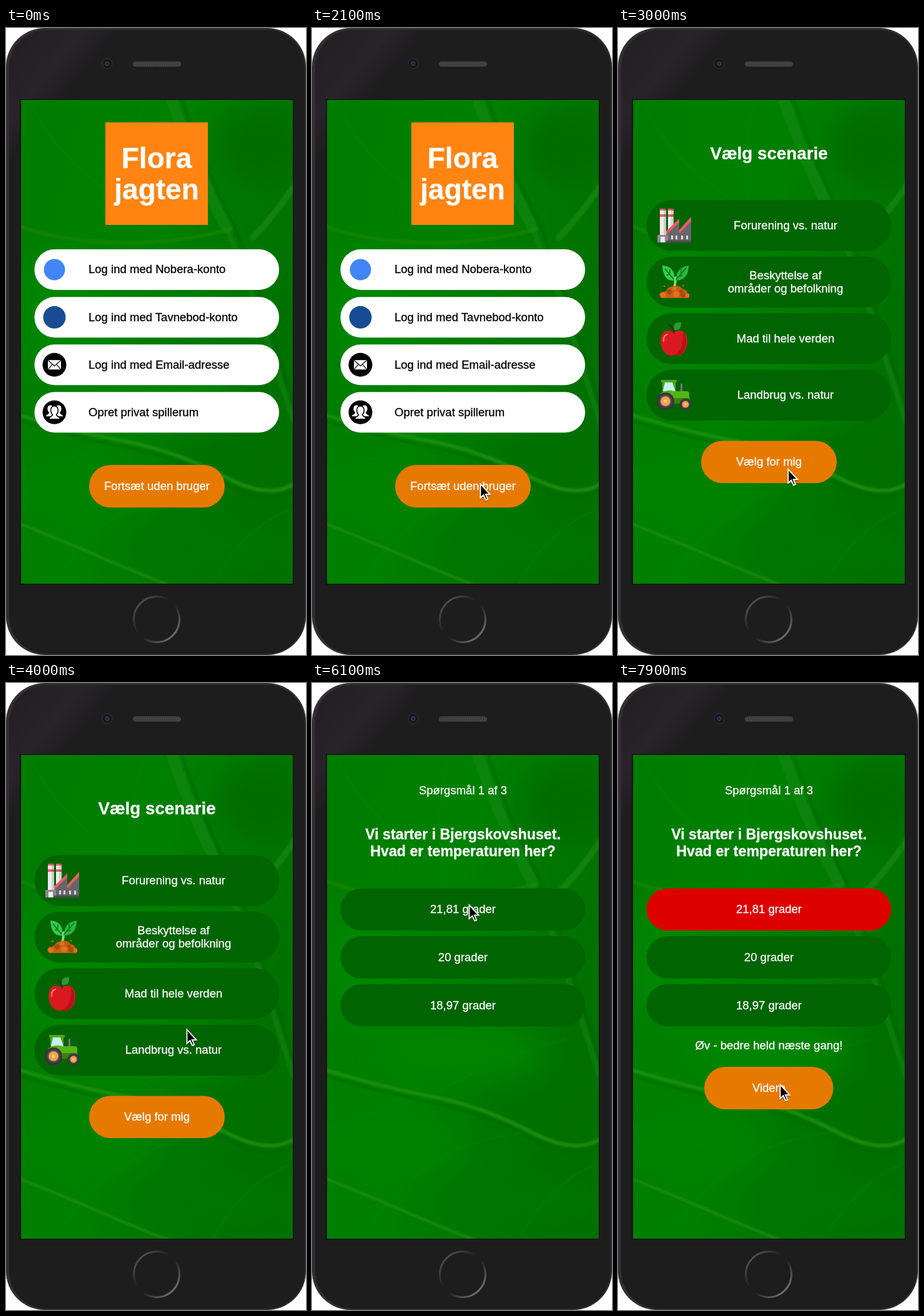
Recreate the animation shown at these times as an HTML page. Size 480 px wide and 1003 px high, loop 8000 ms.

```html
<!DOCTYPE html>
<html lang="da">
<head>
<meta charset="utf-8">
<title>Quiz</title>
<style>
html, body { margin: 0; width: 100%; height: 100%; overflow: hidden; background: #fff; }
svg { display: block; width: 100%; height: 100%; }
text { font: 18.55px "Liberation Sans", Arial, sans-serif; fill: #fff; stroke: #fff; stroke-width: .3px; }
.mid { text-anchor: middle; }
.title { font-size: 27.75px; font-weight: bold; }
.ask { font-size: 23.2px; font-weight: bold; }
.dark { fill: #000; stroke: #000; }
.brand { font-size: 46px; font-weight: bold; }
</style>
</head>
<body>
<svg viewBox="0 0 480 1003">
  <defs>
    <linearGradient id="body" gradientUnits="userSpaceOnUse" x1="0" y1="0" x2="110" y2="90">
      <stop offset="0" stop-color="#201e21"/>
      <stop offset=".7" stop-color="#29232a"/>
      <stop offset="1" stop-color="#1d1d1d"/>
    </linearGradient>
    <linearGradient id="ring" x1="0" y1="0" x2="1" y2="1">
      <stop offset=".1" stop-color="#555"/>
      <stop offset=".42" stop-color="#1e1e1e"/>
      <stop offset=".55" stop-color="#1e1e1e"/>
      <stop offset=".9" stop-color="#777"/>
    </linearGradient>
    <linearGradient id="leafTone" x2="1" y2=".4">
      <stop offset="0" stop-color="#007c00"/>
      <stop offset=".5" stop-color="#008000"/>
      <stop offset="1" stop-color="#007000"/>
    </linearGradient>
    <pattern id="mesh" width="3" height="3" patternUnits="userSpaceOnUse">
      <rect width="3" height="3" fill="#4a4a4a"/>
      <circle cx="1.5" cy="1.5" r=".9" fill="#2a2a2a"/>
    </pattern>
    <filter id="soft" x="-20%" y="-20%" width="140%" height="140%"><feGaussianBlur stdDeviation="1.6"/></filter>
    <filter id="haze" x="-50%" y="-50%" width="200%" height="200%"><feGaussianBlur stdDeviation="22"/></filter>
    <filter id="shade" x="-50%" y="-50%" width="200%" height="200%">
      <feDropShadow dx="0" dy="1.5" stdDeviation="1.3" flood-opacity=".4"/>
    </filter>
    <clipPath id="screen"><rect x="24" y="115" width="435" height="774"/></clipPath>
  </defs>

  <rect width="480" height="1003" rx="62" fill="#302f31"/>
  <rect x="5" y="3" width="473" height="998" rx="60" fill="url(#body)"/>
  <circle cx="162" cy="57" r="8" fill="#18161c" stroke="#38303c"/>
  <circle cx="162" cy="57" r="3" fill="#262238" stroke="#4a4468"/>
  <rect x="203" y="53.5" width="77" height="8.5" rx="4.2" fill="url(#mesh)"/>
  <circle cx="241" cy="946" r="36.5" fill="none" stroke="url(#ring)" stroke-width="3"/>
  <rect x="22.5" y="114" width="437.5" height="776" fill="#080808"/>

  <g clip-path="url(#screen)">
    <rect x="24" y="115" width="435" height="774" fill="#fff"/>
    <g id="leaf" fill="none">
      <rect x="24" y="115" width="435" height="774" fill="url(#leafTone)"/>
      <g filter="url(#haze)">
        <ellipse cx="410" cy="190" rx="70" ry="60" fill="#006c00"/>
        <ellipse cx="90" cy="450" rx="70" ry="100" fill="#008600"/>
        <ellipse cx="240" cy="590" rx="130" ry="40" fill="#008400"/>
        <ellipse cx="370" cy="680" rx="100" ry="26" fill="#007000"/>
        <ellipse cx="130" cy="740" rx="110" ry="45" fill="#008200"/>
        <ellipse cx="330" cy="830" rx="130" ry="45" fill="#007400"/>
      </g>
      <g filter="url(#soft)" stroke-linecap="round">
        <path d="M262 105Q300 220 352 318" stroke="#108610" stroke-width="18" opacity=".7"/>
        <path d="M352 318Q395 420 460 630" stroke="#108610" stroke-width="9" opacity=".5"/>
        <path d="M278 105Q320 230 366 318Q410 430 465 620" stroke="#006000" stroke-width="4" opacity=".6"/>
        <path d="M470 240Q430 300 395 335" stroke="#208a10" stroke-width="10" opacity=".65"/>
        <path d="M15 312Q50 334 150 342T360 322" stroke="#1f8a08" stroke-width="6" opacity=".5"/>
        <path d="M15 617Q110 646 190 661T350 718T470 722" stroke="#249010" stroke-width="6" opacity=".8"/>
        <path d="M15 626Q110 655 190 670T350 728T470 732" stroke="#006800" stroke-width="4" opacity=".6"/>
        <path d="M15 790Q90 820 150 846T270 895" stroke="#249010" stroke-width="5" opacity=".65"/>
        <path d="M40 120Q80 210 185 275M220 120Q190 210 215 320M30 500Q160 450 330 430M100 610Q130 520 210 450M90 870Q190 730 350 718M200 655Q290 600 405 570M25 710Q100 690 190 660M330 890Q380 800 455 770" stroke="#109010" stroke-width="2" opacity=".4"/>
      </g>
    </g>
    <g id="login"></g>
    <g id="scenes"></g>
    <g id="quiz"></g>
  </g>
  <path id="cursor" d="M1.5 2.5V24.5L6.5 20L10.2 28L13.2 26.7L9.8 18.8H16.5Z" fill="#000" stroke="#fff" stroke-width="1.8" filter="url(#shade)"/>
</svg>
<script>
const $ = id => document.getElementById(id);
const ORANGE = '#e67a00', GREEN = '#006400';
const pill = (x, y, w, h, fill, id = '') =>
  `<rect ${id && `id="${id}"`} x="${x}" y="${y}" width="${w}" height="${h}" rx="${h / 2}" fill="${fill}"/>`;
const label = (x, y, text, cls = 'mid') => `<text x="${x}" y="${y}" class="${cls}">${text}</text>`;
const at = (x, y, art) => `<g transform="translate(${x} ${y})">${art}</g>`;
const disc = (x, y, r, fill) => `<circle cx="${x}" cy="${y}" r="${r}" fill="${fill}"/>`;
const shape = (d, fill) => `<path d="${d}" fill="${fill}"/>`;

const envelope = disc(0, 0, 19, '#000') +
  '<rect x="-10.5" y="-7.5" width="21" height="15" rx="1" fill="#fff"/>' +
  '<path d="M-10-7L0 2L10-7M-10 7L-3-1M10 7L3-1" fill="none" stroke="#000" stroke-width="1.2"/>';

const person = 'M-9 10C-9 5-3 6-3 3C-8-3-6-11 0-11S8-3 3 3C3 6 9 5 9 10Z';
const group = disc(0, 0, 19, '#000') +
  [[-6.5, -2, .9], [6.5, -2, .9], [0, 1, 1]].map(([x, y, size]) =>
    at(x, y, `<path d="${person}" fill="#fff" stroke="#000" stroke-width="1.5" transform="scale(${size})"/>`)).join('');

const factory =
  shape('M4 0H14V44H4ZM17 0H26V44H17Z', '#eee') +
  shape('M4 0H14V3H4ZM17 0H26V3H17ZM4 9H14V13H4ZM17 9H26V13H17Z', '#f0606c') +
  shape('M10 0H14V44H10ZM22 0H26V44H22Z', '#0002') +
  shape('M14 54V38L35 18V36L54 16V54Z', '#68646c') +
  shape('M14 42V36L35 16V22ZM35 40V34L54 13V20Z', '#f05a68') +
  shape('M0 42H17V54H0Z', '#8c8890') + shape('M5 45H12V54H5Z', '#eee') +
  shape('M22 43H25V49H22ZM29 43H32V49H29ZM38 43H41V49H38ZM46 43H49V49H46Z', '#ddd') +
  shape('M14 51H54V54H14Z', '#4e4a52');

const sprout =
  '<path d="M24 36Q27 25 25 19" fill="none" stroke="#84d878" stroke-width="4"/>' +
  shape('M24 25C10 26 6 15 5 1C18 2 26 9 24 25Z', '#36cc4a') +
  shape('M26 25C28 8 35 3 47 1C47 17 39 25 26 25Z', '#28b83c') +
  '<path d="M9 6L23 23M43 5L27 23M12 16L17 16M17 7V14M37 17L31 18M35 7V13" fill="none" stroke="#08701c" stroke-width="1.5"/>' +
  shape('M3 53Q-3 47 4 43Q8 44 11 41Q16 33 24 34Q32 32 38 39Q44 40 44 44Q51 46 47 53Z', '#c86012') +
  [[6, 48, 4], [16, 43, 4], [27, 47, 5], [38, 48, 4], [24, 38, 3], [35, 42, 3], [45, 49, 3]]
    .map(([x, y, r], i) => disc(x, y, r, i % 2 ? '#a84c08' : '#de7420')).join('') +
  disc(8, 34, 1.5, '#c86012') + disc(38, 33, 1.5, '#c86012');

const apple =
  shape('M21 17C8 9 0 18 0 31C0 43 8 54 16 54Q19 54 22 53Q25 54 28 54C36 54 43 43 43 31C43 18 34 9 21 17Z', '#d81a20') +
  '<path d="M22 18Q21 9 14 5" fill="none" stroke="#402820" stroke-width="2.5"/>' +
  shape('M22 13C19 4 25 0 33 1C34 9 30 14 22 13Z', '#2c9a34') +
  '<path d="M5 31Q4 22 11 20" fill="none" stroke="#ff8088" stroke-width="2" stroke-linecap="round"/>' +
  shape('M36 17C43 23 44 40 34 51Q27 55 22 53Q38 45 36 17Z', '#b8101a');

const wheel = (x, y, r) => disc(x, y, r, '#39363c') + disc(x, y, r * .72, '#555158') +
  disc(x, y, r * .56, '#f6a04a') + disc(x, y, r * .2, '#ffc880');
const tractor =
  shape('M5 0H30V4H5Z', '#4ea814') +
  shape('M7 3H28V21H7Z', '#4ea814') + shape('M11 4H23L28 18H8Z', '#c8f0f4') +
  shape('M36 6H39V18H36Z', '#77747a') +
  shape('M3 22Q14 14 26 18H46Q50 18 50 23V34H4Z', '#54b414') +
  shape('M26 29H51V38H26Z', '#3c8010') +
  wheel(12, 34, 14) + wheel(44, 39, 9.5);

$('login').innerHTML =
  '<rect x="159" y="151" width="164" height="164" fill="#ff8412"/>' +
  label(241, 224, 'Flora', 'mid brand') + label(241, 274, 'jagten', 'mid brand') +
  [['Log ind med Nobera-konto', 354, disc(0, 0, 17, '#4285f4')],
   ['Log ind med Tavnebod-konto', 430.3, disc(0, 0, 18, '#174c94')],
   ['Log ind med Email-adresse', 506.3, envelope],
   ['Opret privat spillerum', 582.3, group]].map(([text, y, icon]) =>
    pill(45.5, y, 391.5, 65, '#fff') + at(77.5, y + 32.5, icon) + label(132, y + 38.3, text, 'dark')).join('') +
  pill(133, 699, 217, 68, ORANGE) + label(241.5, 739, 'Fortsæt uden bruger');

$('scenes').innerHTML =
  [[63, 289, factory], [66, 379, sprout], [68, 470, apple], [64, 563, tractor]].map(([x, y, icon], i) =>
    pill(45.5, 275.2 + 90.5 * i, 391.5, 81.3, GREEN) + at(x, y, icon)).join('') +
  pill(133, 660.5, 217, 67.5, ORANGE) +
  '<g id="sceneText">' + label(241.5, 210, 'Vælg scenarie', 'mid title') +
  [['Forurening vs. natur', 321.5], ['Beskyttelse af', 402], ['områder og befolkning', 423],
   ['Mad til hele verden', 502.5], ['Landbrug vs. natur', 593]]
    .map(([text, y]) => label(268, y, text)).join('') +
  label(241.5, 700, 'Vælg for mig') + '</g>';

$('quiz').innerHTML =
  label(241.5, 177.5, 'Spørgsmål 1 af 3') +
  label(241.5, 250, 'Vi starter i Bjergskovshuset.', 'mid ask') +
  label(241.5, 277, 'Hvad er temperaturen her?', 'mid ask') +
  ['21,81 grader', '20 grader', '18,97 grader'].map((text, i) =>
    pill(45.5, 328.5 + 76.6 * i, 391.5, 67.5, GREEN, 'answer' + i) +
    label(241.5, 368.3 + 76.6 * i, text)).join('') +
  '<g id="result">' + label(241.5, 586, 'Øv - bedre held næste gang!') +
  pill(138, 614, 206.5, 68, ORANGE) + label(241.5, 654, 'Videre') + '</g>';

// Cursor stops: time, x, y
const stops = [[800, 482, 540], [1300, 302, 703], [1800, 268, 727], [2700, 268, 727], [4000, 288, 552],
  [4500, 251, 322], [5600, 251, 322], [6200, 250, 355], [7200, 250, 355], [7900, 258, 640]];

function cursorAt(t) {
  const i = Math.max(1, stops.findIndex(s => s[0] >= t));
  const [a, b] = [stops[i - 1], stops[i]];
  const p = Math.max(0, (t - a[0]) / (b[0] - a[0])), k = p * p * (3 - 2 * p);
  return [1, 2].map(n => a[n] + (b[n] - a[n]) * k);
}

const show = (id, on) => $(id).style.display = on ? '' : 'none';

function draw(now) {
  const t = Math.floor(now % 8000 / 100) * 100;
  const loading = t >= 2400 && t < 2600;
  show('leaf', !loading);
  show('login', t < 2400);
  show('scenes', t >= 2400 && t < 4700);
  show('sceneText', !loading);
  show('quiz', t >= 4700);
  $('answer0').setAttribute('fill', t >= 6400 ? '#dc0000' : GREEN);
  $('result').setAttribute('opacity', Math.max(0, Math.min(1, (t - 6400) / 800)));
  show('cursor', t > 800);
  $('cursor').setAttribute('transform', `translate(${cursorAt(t)})`);
  requestAnimationFrame(draw);
}
requestAnimationFrame(draw);
</script>
</body>
</html>
```
